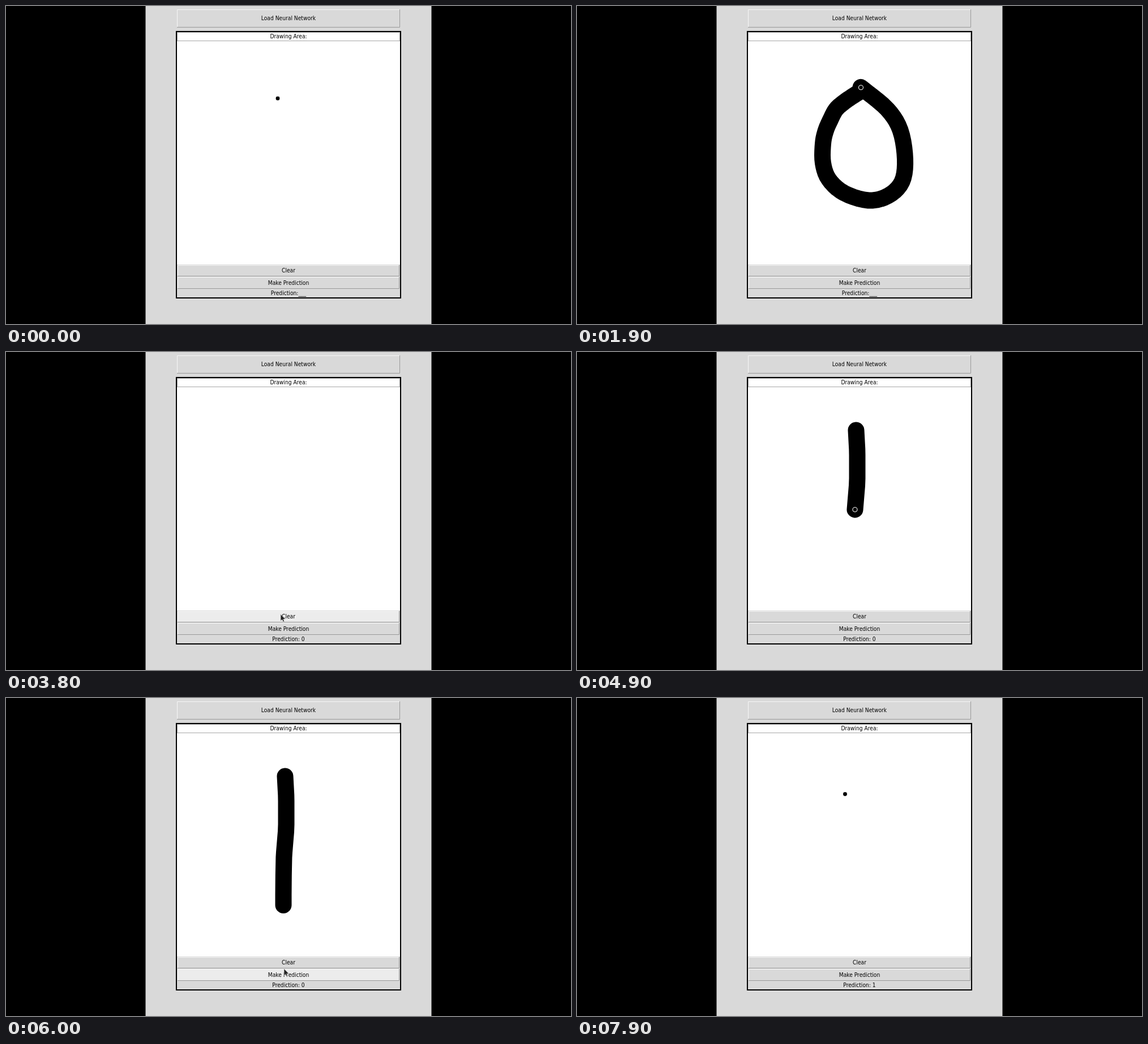
These frames come from a looping animation (998x561 px, 8 s). An HTML page:

```html
<!DOCTYPE html>
<html lang="en">
<head>
<meta charset="utf-8">
<title>Digit recognition</title>
<style>
  html, body { margin: 0; width: 100%; height: 100%; overflow: hidden; background: #000; }
  svg { display: block; width: 100vw; height: 100vh; }
  text {
    font-family: "DejaVu Sans Condensed", "DejaVu Sans", sans-serif;
    font-stretch: condensed;
    font-size: 10.2px;
    text-anchor: middle;
  }
</style>
</head>
<body>
<svg viewBox="0 0 998 561">
  <rect width="998" height="561"/>
  <rect x="246.5" width="505" height="561" fill="#d9d9d9"/>
  <rect x="302" y="46" width="394" height="410" fill="#fff"/>
  <rect x="302.5" y="46.5" width="393" height="15" fill="#fff" stroke="#a6a6a6"/>
  <text x="499" y="57">Drawing Area:</text>
  <g id="ink" fill="none" stroke="#000" stroke-width="29" stroke-linecap="round" stroke-linejoin="round"></g>
  <rect x="302" y="456" width="394" height="58" fill="#d9d9d9"/>
  <g id="buttons"></g>
  <text id="result" x="499" y="510"></text>
  <rect x="301" y="45" width="396" height="470" fill="none" stroke="#000" stroke-width="2"/>
  <circle id="dot" r="4" stroke="#fff" stroke-width="1.1"/>
  <path id="arrow" d="M0 0V12L2.8 9.6L4.6 13.6L6.6 12.7L4.9 8.8H8.6Z" fill="#222" stroke="#eee" stroke-width=".7"/>
</svg>
<script>
const LOOP = 8000, STEP = 100;
const $ = id => document.getElementById(id);

// Smooth pointer curve while the zero is drawn, one point per step
const ring = [
  [480, 163], [489, 157], [498, 152], [484, 161], [470, 171], [457, 183], [447, 202],
  [439, 221], [434.5, 243], [434.5, 277], [445, 306], [472, 330], [515, 343], [550, 334.5],
  [574, 310], [579.5, 270], [571, 219], [548, 182], [506, 147], [501.5, 143.8]
];
const RING_END = (ring.length - 1) * STEP;

// Straight pointer moves after that: time, x, y
const moves = [
  [1900, 501.5, 143.8], [2000, 501, 160], [2400, 496, 440], [2600, 493, 487], [2800, 493, 487],
  [3200, 485, 462.5], [3800, 485, 462.5], [4400, 493, 150], [4500, 493, 138], [4650, 493, 138],
  [4740, 495, 175], [4820, 495, 230], [4900, 491, 278], [5000, 490.3, 312], [5200, 490, 347],
  [5400, 490, 360], [5600, 490, 365.5], [5800, 491, 466], [5900, 491, 466], [6000, 491, 477.5],
  [6100, 491, 484], [6500, 491, 484], [7100, 487.5, 467.5], [7600, 487.5, 467.5],
  [7700, 484, 420], [7900, 473.5, 169.5]
];

const strokes = [
  { down: 200, up: 1900, clear: 3800 },
  { down: 4650, up: 5600, clear: 7600 }
];

const buttons = [
  { label: "Load Neural Network", x: 302, y: 6, w: 394, h: 32, base: 25.3, press: [] },
  { label: "Clear", x: 303, y: 457, w: 392, h: 20, base: 470, press: [3700, 7500] },
  { label: "Make Prediction", x: 303, y: 478, w: 392, h: 21, base: 492, press: [2700, 6400] }
];

function set(el, attrs) {
  for (const key in attrs) el.setAttribute(key, attrs[key]);
}

function add(parent, tag, attrs = {}) {
  const el = document.createElementNS("http://www.w3.org/2000/svg", tag);
  set(el, attrs);
  parent.append(el);
  return el;
}

for (const s of strokes) s.path = add($("ink"), "path");

for (const b of buttons) {
  const { x, y, w, h } = b, g = $("buttons");
  b.face = add(g, "rect", { x, y, width: w, height: h });
  b.lit = add(g, "path", { d: `M${x + .5} ${y + h}V${y + .5}H${x + w}`, fill: "none" });
  b.shade = add(g, "path", { d: `M${x} ${y + h - .5}H${x + w - .5}V${y}`, fill: "none" });
  b.text = add(g, "text", { x: x + w / 2, y: b.base });
  b.text.textContent = b.label;
}

// Smaller size when only the regular face is available
if (buttons[0].text.getComputedTextLength() > 101) {
  for (const el of document.querySelectorAll("text")) el.style.fontSize = "9.2px";
}

// Catmull-Rom spline through the ring points
function ringAt(t) {
  const i = Math.floor(t / STEP), f = t / STEP - i;
  const at = n => ring[Math.max(0, Math.min(ring.length - 1, n))];
  const [a, b, c, d] = [at(i - 1), at(i), at(i + 1), at(i + 2)];
  return [0, 1].map(k => b[k] + f / 2 * (c[k] - a[k]
    + f * (2 * a[k] - 5 * b[k] + 4 * c[k] - d[k]
    + f * (3 * (b[k] - c[k]) + d[k] - a[k]))));
}

function pointAt(t) {
  if (t <= RING_END) return ringAt(t);
  const i = moves.findIndex(m => m[0] >= t);
  if (i < 0) return moves[moves.length - 1].slice(1);
  const [t0, x0, y0] = moves[i - 1], [t1, x1, y1] = moves[i];
  const f = (t - t0) / (t1 - t0);
  return [x0 + (x1 - x0) * f, y0 + (y1 - y0) * f];
}

function strokePath({ down, up, clear }, t) {
  if (t < down || t >= clear) return "";
  const end = Math.min(t, up), points = [];
  for (let s = down; s < end; s += 20) points.push(pointAt(s));
  points.push(pointAt(end));
  if (points.length < 2) points.push(points[0]);
  return "M" + points.map(p => p.join(" ")).join("L");
}

function render(time) {
  const t = Math.floor(time % LOOP / STEP) * STEP;
  const [x, y] = pointAt(t);
  const drawing = y < 456;

  for (const s of strokes) set(s.path, { d: strokePath(s, t) });

  for (const b of buttons) {
    const hover = !drawing && y >= b.y - 1 && y < b.y + b.h - .5;
    const pressed = b.press.includes(t);
    set(b.face, { fill: hover ? "#ececec" : "#d9d9d9" });
    set(b.lit, { stroke: pressed ? "#999" : "#f6f6f6" });
    set(b.shade, { stroke: pressed ? "#f6f6f6" : "#999" });
    set(b.text, { transform: pressed ? "translate(.8 1.2)" : "" });
  }

  $("result").textContent = "Prediction:" + (t < 2800 ? "___" : t < 6500 ? " 0" : " 1");
  set($("dot"), { cx: x, cy: y, visibility: drawing ? "visible" : "hidden" });
  set($("arrow"), { transform: `translate(${x} ${y})`, visibility: drawing ? "hidden" : "visible" });
}

const start = performance.now();
function tick() {
  render(performance.now() - start);
  requestAnimationFrame(tick);
}
tick();
</script>
</body>
</html>
```
